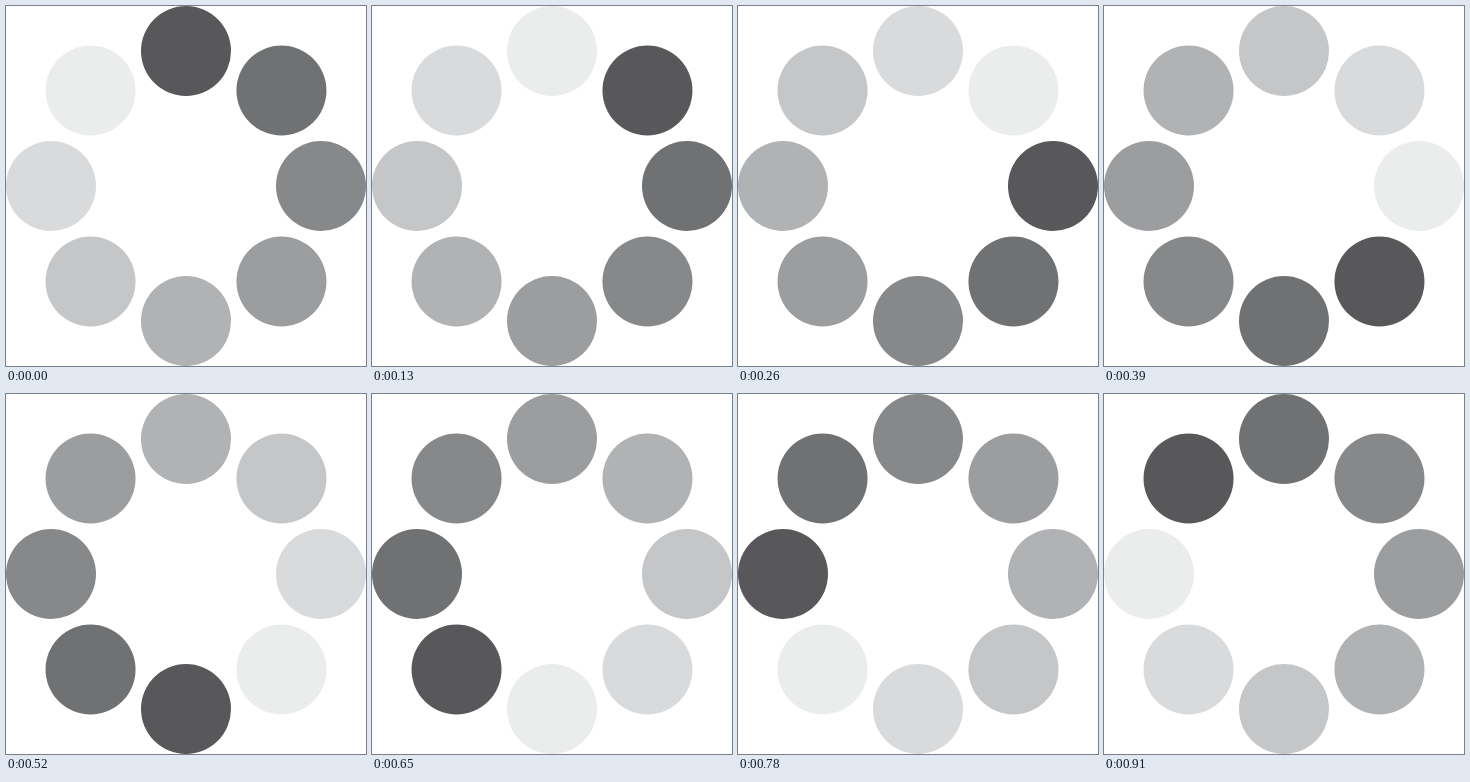
Recreate the animation shown at these times as an HTML page. Size 360x360 px, loop 1.04 s.

```html
<!DOCTYPE html>
<html lang="en">
<head>
<meta charset="utf-8">
<title>Loading spinner</title>
<style>
  html, body { margin: 0; height: 100%; overflow: hidden; background: #fff; }
  svg { display: block; width: 100%; height: 100%; }
</style>
</head>
<body>
<svg viewBox="0 0 360 360"></svg>
<script>
const STEP_MS = 130;
const SHADES = ['#58585a', '#707173', '#878889', '#9c9d9f', '#b1b2b4', '#c5c6c8', '#d9dadc', '#ebedec'];
const COUNT = SHADES.length;
const svg = document.querySelector('svg');

// Dots run clockwise from the top.
const dots = SHADES.map((_, i) => {
  const angle = i / COUNT * 2 * Math.PI;
  const dot = document.createElementNS(svg.namespaceURI, 'circle');
  dot.setAttribute('cx', 180 + 135 * Math.sin(angle));
  dot.setAttribute('cy', 180 - 135 * Math.cos(angle));
  dot.setAttribute('r', 45);
  return svg.appendChild(dot);
});

function draw(time) {
  const step = Math.floor(time / STEP_MS) % COUNT;
  dots.forEach((dot, i) => dot.setAttribute('fill', SHADES[(i - step + COUNT) % COUNT]));
}

const start = performance.now();
function tick() {
  draw(performance.now() - start);
  requestAnimationFrame(tick);
}
tick();
</script>
</body>
</html>
```
